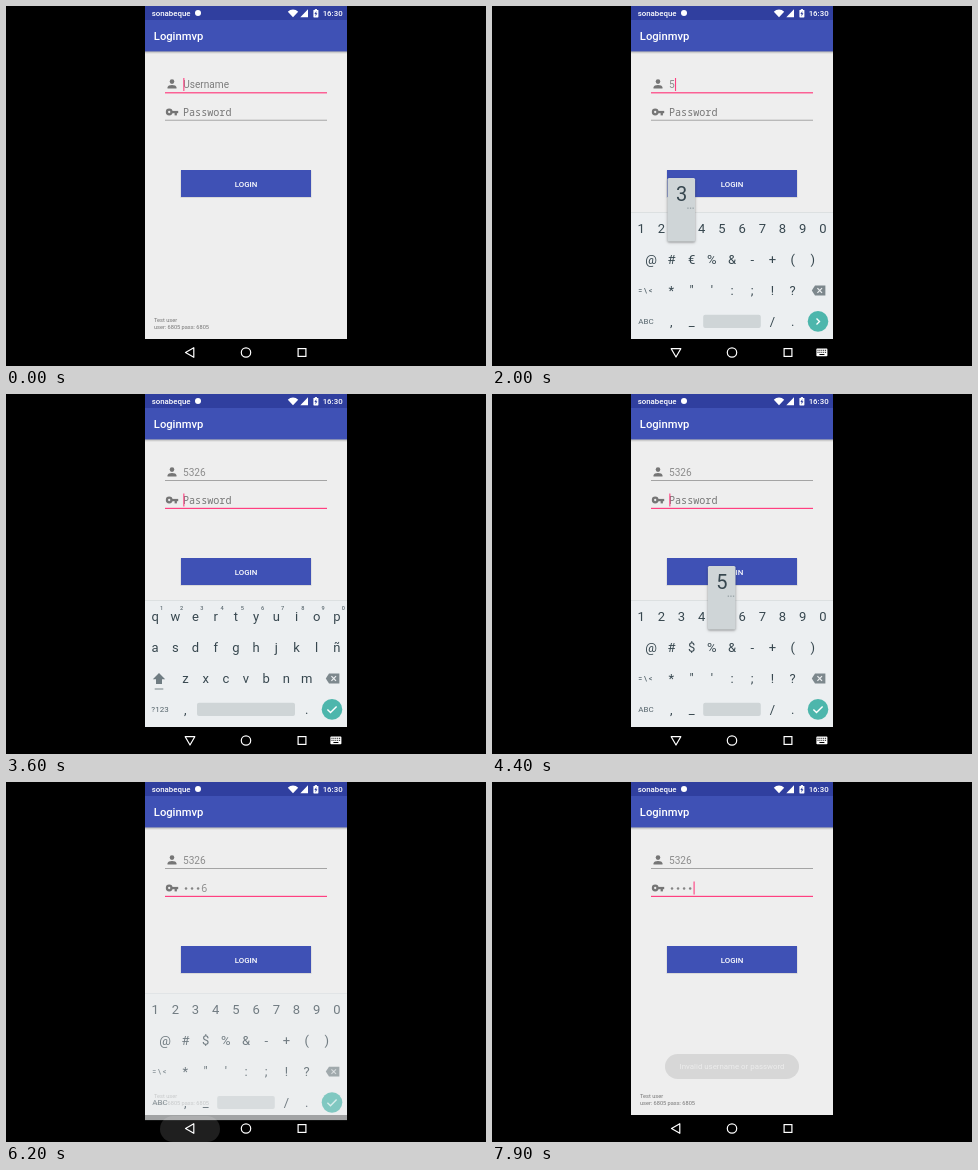
Animation, 480 px wide and 360 px high, one loop 8 s. Source, as an HTML page with a canvas:

```html
<!DOCTYPE html>
<html lang="en">
<head>
<meta charset="utf-8">
<title>Login screen</title>
<style>
  html, body { margin: 0; width: 100%; height: 100%; overflow: hidden; background: #000; }
  canvas { display: block; width: 480px; height: 360px; }
</style>
</head>
<body>
<canvas id="stage"></canvas>
<script>
const canvas = document.getElementById('stage');
const g = canvas.getContext('2d');
const dpr = window.devicePixelRatio || 1;
canvas.width = 480 * dpr;
canvas.height = 360 * dpr;

const LOOP = 8000;
const SANS = 'Roboto, "Open Sans", sans-serif';
const MONO = '"Noto Sans Mono", "DejaVu Sans Mono", monospace';
const PINK = '#ff4081', BLUE = '#3f51b5', GREY = '#757575';
const INK = '#37474f', KEY = '#cfd5d7', TEAL = '#4db6ac';

const CODE = '5326', TEST = '6805';
const NEXT = 3400;                        // focus moves to the password
const userTimes = [1600, 2200, 2700, 3100];
const passTimes = [4500, 4800, 5100, 5500];
const REVEAL = 1500;                      // last password character stays readable
// stretches in which the picture stands still
const holds = [[100, 400], [1000, 1300], [1600, 1900], [3400, 3600],
               [3600, 3800], [4100, 4300], [5600, 5800]];

const ramp = (t, a, b) => Math.min(1, Math.max(0, (t - a) / (b - a)));
const within = (t, a, b) => t >= a && t < b;
const typed = (t, times) => times.filter(x => x <= t).length;

function rect(x, y, w, h, color) {
  g.fillStyle = color;
  g.fillRect(x, y, w, h);
}

function round(x, y, w, h, r, color) {
  g.fillStyle = color;
  g.beginPath();
  g.roundRect(x, y, w, h, r);
  g.fill();
}

function disc(x, y, r, color) {
  g.fillStyle = color;
  g.beginPath();
  g.arc(x, y, r, 0, Math.PI * 2);
  g.fill();
}

function poly(points, color) {
  g.fillStyle = color;
  g.beginPath();
  points.forEach(([x, y]) => g.lineTo(x, y));
  g.closePath();
  g.fill();
}

function line(points, color, width) {
  g.strokeStyle = color;
  g.lineWidth = width;
  g.beginPath();
  points.forEach(([x, y]) => g.lineTo(x, y));
  g.stroke();
}

function text(s, x, y, size, color, opt = {}) {
  g.font = `${opt.weight || 400} ${size}px ${opt.font || SANS}`;
  g.textAlign = opt.align || 'left';
  g.fillStyle = color;
  g.fillText(s, x, y);
}

function statusBar() {
  rect(139, 0, 202, 14, '#303f9f');
  text('sonabeque', 145.7, 10, 7.86, '#fff', { weight: 500 });
  disc(192, 7, 3, '#fff');
  // wifi
  g.fillStyle = '#fff';
  g.beginPath();
  g.moveTo(287, 11.2);
  g.arc(287, 11.2, 7.6, -Math.PI * 0.74, -Math.PI * 0.26);
  g.fill();
  poly([[302, 3.2], [302, 11.2], [294.3, 11.2]], '#fff');
  // battery
  round(307.4, 4, 5, 7.4, 0.6, '#fff');
  rect(308.8, 3.1, 2.2, 1.2, '#fff');
  poly([[310.4, 5], [308.4, 8], [309.6, 8], [309.4, 10.4], [311.4, 7.2], [310.2, 7.2]], '#303f9f');
  text('16:30', 336.6, 10, 7.86, '#fff', { weight: 500, align: 'right' });
}

function appBar() {
  const shade = g.createLinearGradient(0, 45, 0, 48);
  shade.addColorStop(0, 'rgba(0,0,0,.28)');
  shade.addColorStop(1, 'rgba(0,0,0,0)');
  rect(139, 45, 202, 3, shade);
  rect(139, 14, 202, 31.4, BLUE);
  text('Loginmvp', 147.8, 34, 11.22, '#fff', { weight: 500 });
}

function personIcon() {
  disc(166, 75.6, 2.3, GREY);
  g.beginPath();
  g.moveTo(161.5, 82.6);
  g.lineTo(161.5, 81.5);
  g.bezierCurveTo(161.5, 78.2, 170.5, 78.2, 170.5, 81.5);
  g.lineTo(170.5, 82.6);
  g.fill();
}

function keyIcon() {
  disc(163.2, 106, 3.4, GREY);
  rect(165, 104.9, 7.2, 2.3, GREY);
  rect(168.6, 106, 2.3, 3.4, GREY);
  disc(163.2, 106, 1.15, '#eee');
}

function fields(t) {
  const onPass = t >= NEXT;
  const nUser = typed(t, userTimes), nPass = typed(t, passTimes);
  personIcon();
  keyIcon();

  if (nUser) text(CODE.slice(0, nUser), 177, 82.4, 10.1, '#8c8c8c');
  else text('Username', 177.2, 82.4, 10.1, '#7d7d7d');

  const mono = { font: MONO };
  if (nPass) {
    const open = t - passTimes[nPass - 1] < REVEAL;
    for (let i = 0; i < nPass; i++) {
      const x = 177 + 6.06 * i;
      if (open && i === nPass - 1) text(CODE[i], x, 110, 10.1, '#8c8c8c', mono);
      else disc(x + 3, 106.4, 1.25, '#858585');
    }
  } else text('Password', 177, 110, 10.1, '#777', mono);

  rect(159, 86.2, 162, onPass ? 0.7 : 1.2, onPass ? '#858585' : PINK);
  rect(159, 113.8, 162, onPass ? 1.2 : 0.7, onPass ? PINK : '#858585');

  const marks = [-400, NEXT, ...userTimes, ...passTimes].filter(x => x <= t);
  if (Math.floor((t - Math.max(...marks)) / 500) % 2 === 0) {
    const x = onPass ? 177.3 + 6.06 * nPass : 177.3 + 5.67 * nUser;
    rect(x, onPass ? 99.5 : 72, 1.1, 13, PINK);
  }
}

function loginButton(t) {
  rect(174.5, 164.5, 131, 27.3, 'rgba(0,0,0,.12)');
  rect(175, 164, 130, 27, BLUE);
  if (within(t, 7000, 7500)) {
    g.save();
    g.beginPath();
    g.rect(175, 164, 130, 27);
    g.clip();
    g.globalAlpha = 0.2 * (1 - ramp(t, 7200, 7500));
    disc(240, 177.5, 15 + 60 * ramp(t, 6900, 7300), '#fff');
    g.restore();
  }
  text('LOGIN', 240, 180.5, 7.86, '#fff', { weight: 500, align: 'center' });
}

function toast(t) {
  const a = 0.12 * ramp(t, 7800, 7900);
  if (!a) return;
  round(173, 272, 134, 25, 12.5, `rgba(50,50,50,${a})`);
  text('Invalid username or password', 240, 287.4, 7.86, `rgba(255,255,255,${a * 4.5})`, { align: 'center' });
}

const col = i => 149.1 + 20.2 * i;

function keyRow(chars, first, y) {
  [...chars].forEach((c, i) => text(c, col(first + i), y, 13, INK, { align: 'center' }));
}

function backspace() {
  poly([[319.8, 284.5], [323, 279.6], [333.4, 279.6], [333.4, 289.4], [323, 289.4]], '#7d888d');
  line([[325.4, 282.2], [330, 286.8]], '#eceff1', 1.2);
  line([[330, 282.2], [325.4, 286.8]], '#eceff1', 1.2);
}

function shiftKey() {
  poly([[153, 279], [159.2, 285.2], [156, 285.2], [156, 290], [150, 290], [150, 285.2], [146.8, 285.2]], '#6f7c82');
  rect(148.7, 294.4, 8.6, 1.2, '#8c979b');
}

function keyboard(t) {
  const p = t < 3000 ? ramp(t, 300, 700) : 1 - ramp(t, 6100, 6413);
  if (!p) return;
  const letters = t < 1000 || within(t, NEXT, 3900);
  const mid = { align: 'center' };
  g.save();
  g.globalAlpha = p;
  g.translate(0, 16 * (1 - p));
  rect(139, 206, 202, 127, '#eceff1');
  rect(139, 206, 202, 0.8, '#d9dcde');
  if (within(t, 900, 1300) || within(t, 3800, 4100)) rect(140.7, 304, 27, 23, KEY);

  if (letters) {
    keyRow('qwertyuiop', 0, 227);
    keyRow('asdfghjklñ', 0, 258);
    keyRow('zxcvbnm', 1.5, 289);
    [...'1234567890'].forEach((c, i) =>
      text(c, col(i) + 6.4, 216, 5.6, '#5f6d74', { weight: 500, align: 'center' }));
    shiftKey();
    text('?123', 154, 318.3, 8, '#56656c', mid);
    keyRow(',', 1.5, 320);
    round(191, 308.8, 98, 13.2, 2, KEY);
    keyRow('.', 7.5, 320);
  } else {
    keyRow('1234567890', 0, 227);
    keyRow(`@#${t < NEXT ? '€' : '$'}%&-+()`, 0.5, 258);
    keyRow('*"\':;!?', 1.5, 289);
    text('= \\ <', 153.3, 287, 7, '#56656c', { weight: 500, align: 'center' });
    text('ABC', 154, 318.3, 8, '#56656c', mid);
    keyRow(',_', 1.5, 320);
    round(211.2, 308.8, 57.6, 13.2, 2, KEY);
    keyRow('/.', 6.5, 320);
  }
  backspace();

  disc(326, 315.4, 10.3, within(t, 3300, NEXT) ? '#399a90' : TEAL);
  const mark = t < NEXT ? [[324.5, 312.4], [327.5, 315.4], [324.5, 318.4]]
                        : [[321.4, 315.6], [324.5, 318.6], [330.6, 312.4]];
  line(mark, '#fff', 1.4);
  g.restore();
}

function keyPopup(t) {
  for (const times of [userTimes, passTimes]) {
    times.forEach((end, i) => {
      if (!within(t, end - 200, end)) return;
      const x = col((+CODE[i] + 9) % 10);
      g.save();
      g.shadowColor = 'rgba(0,0,0,.4)';
      g.shadowBlur = 2.5 * dpr;
      g.shadowOffsetY = dpr;
      round(x - 14, 172, 27.6, 63.5, 1.5, KEY);
      g.restore();
      text(CODE[i], x, 195.4, 20, INK, { align: 'center' });
      for (let d = 0; d < 3; d++) rect(x + 5.8 + 2.6 * d, 201.6, 1.3, 1.1, '#8c979b');
    });
  }
}

function navIcons(t) {
  const shown = within(t, 500, 6100);
  if (within(t, 5900, 6600)) {
    const w = 22 + 38 * ramp(t, 5800, 6100);
    g.globalAlpha = 1 - ramp(t, 6200, 6600);
    round(184 - w / 2, 334, w, 26, 13, 'rgba(255,255,255,.12)');
    g.globalAlpha = 1;
  }
  g.save();
  g.translate(184, 346.5);
  if (shown) g.rotate(-Math.PI / 2);
  g.strokeStyle = '#fff';
  g.lineWidth = 1.2;
  g.lineJoin = 'round';
  g.beginPath();
  g.moveTo(-4.5, 0);
  g.lineTo(3.8, -4.8);
  g.lineTo(3.8, 4.8);
  g.closePath();
  g.stroke();
  g.restore();

  g.strokeStyle = '#fff';
  g.lineWidth = 1.2;
  g.beginPath();
  g.arc(240, 346.5, 4.7, 0, Math.PI * 2);
  g.stroke();
  g.strokeRect(292.1, 342.6, 7.8, 7.8);

  if (shown) {
    round(324.4, 342.6, 11, 7.6, 0.8, '#fff');
    for (let r = 0; r < 2; r++)
      for (let c = 0; c < 5; c++) rect(325.5 + 1.9 * c, 343.8 + 2 * r, 1, 1, '#000');
    rect(327.4, 348, 5, 1, '#000');
  }
}

function draw(t) {
  g.setTransform(dpr, 0, 0, dpr, 0, 0);
  rect(0, 0, 480, 360, '#000');
  rect(139, 0, 202, 333, '#eee');
  statusBar();
  appBar();
  fields(t);
  loginButton(t);
  text('Test user', 148, 316, 5.61, '#757575');
  text(`user: ${TEST} pass: ${TEST}`, 148, 322.6, 5.61, '#757575');
  toast(t);
  keyboard(t);
  keyPopup(t);
  navIcons(t);
}

const start = performance.now();
function tick() {
  let t = Math.floor(((performance.now() - start) % LOOP) / 100) * 100;
  const hold = holds.find(([a, b]) => within(t, a, b));
  if (hold) t = hold[0];
  draw(t);
  requestAnimationFrame(tick);
}
tick();
</script>
</body>
</html>
```
